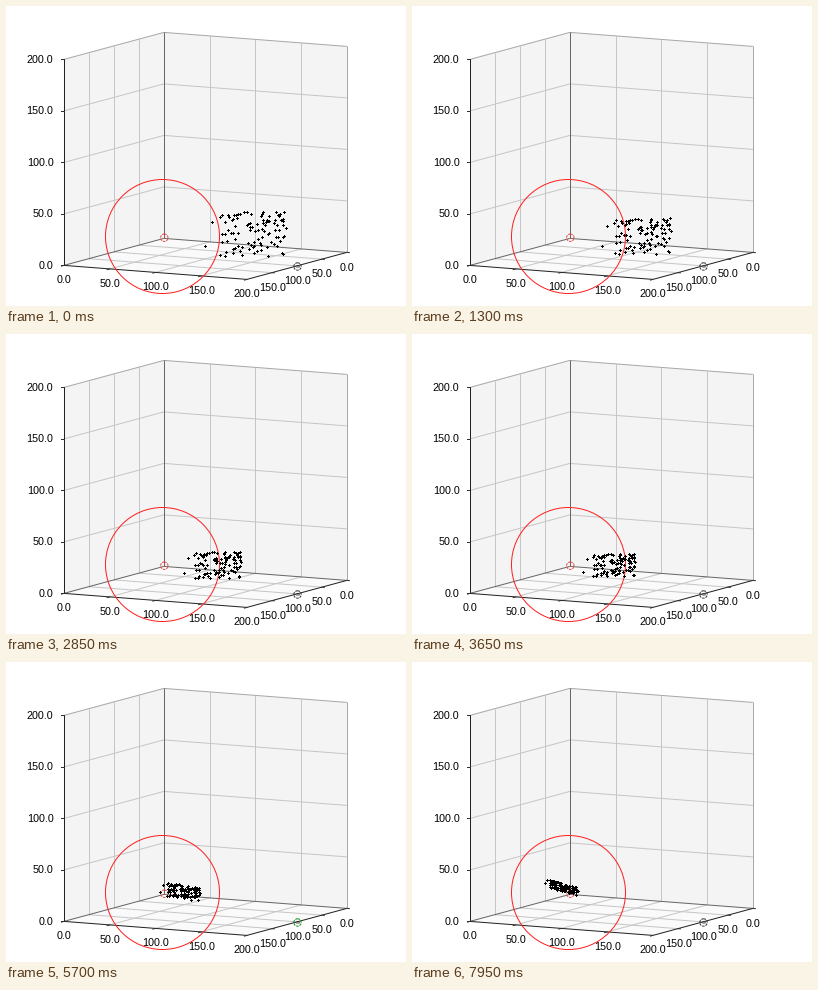
These frames come from a looping animation (400x300 px, 8 s). A matplotlib script:

```python
import numpy as np
import matplotlib.pyplot as plt
from matplotlib.animation import FuncAnimation
from matplotlib.collections import PolyCollection
from matplotlib.patches import Circle, Polygon

PX = 0.72  # points per pixel at 100 dpi
FRAMES, STEP = 160, 50
COUNT = 102

plt.rcParams["font.family"] = "Liberation Sans"
fig = plt.figure(figsize=(4, 3), dpi=100, facecolor="white")
ax = fig.add_axes([0, 0, 1, 1])
ax.set_xlim(0, 400)
ax.set_ylim(300, 0)
ax.axis("off")

# Orthographic box: screen position of the left floor corner and unit axes
ORIGIN = np.array([57.9, 259.4])
AXES = np.array([[183, 14], [100, -27], [0, -206]])


def project(x, y, z):
    return ORIGIN + np.dot([x, y, z], AXES)


def line(a, b, color, z=2):
    p, q = project(*a), project(*b)
    ax.plot([p[0], q[0]], [p[1], q[1]], color=color, lw=PX,
            solid_capstyle="butt", zorder=z)


def face(color, *corners):
    ax.add_patch(Polygon([project(*c) for c in corners], fc=color, ec="none",
                         zorder=0))


def label(value, x, y, ha="center"):
    ax.text(x, y, f"{value:.1f}", fontsize=10.8 * PX, ha=ha,
            va="center_baseline", color="black", zorder=6)


def tick(p, dx, dy):
    ax.plot([p[0], p[0] + dx], [p[1], p[1] + dy], color="#303030",
            lw=PX, zorder=3)


def draw_box():
    left, back, right, front = (0, 0, 0), (0, 1, 0), (1, 1, 0), (1, 0, 0)
    left_top, back_top, right_top = (0, 0, 1), (0, 1, 1), (1, 1, 1)
    face("#f4f4f4", left, back, back_top, left_top)
    face("#f4f4f4", back, right, right_top, back_top)
    face("#fafafa", left, front, right, back)

    grid = "#c6c6c6"
    for s in (0.25, 0.5, 0.75):
        line((0, s, 0), (0, s, 1), grid)
        line((s, 1, 0), (s, 1, 1), grid)
        line((0, 0, s), (0, 1, s), grid)
        line((0, 1, s), (1, 1, s), grid)
        line((s, 0, 0), (s, 1, 0), grid)
        line((0, s, 0), (1, s, 0), grid)

    for a, b in ((left_top, back_top), (back_top, right_top),
                 (right, right_top)):
        line(a, b, "#a8a8a8")
    for end in (left, right, back_top):
        line(back, end, "#666666")
    for a, b in ((left, left_top), (left, front), (front, right)):
        line(a, b, "#222222", z=3)


def draw_labels():
    for s in np.linspace(0, 1, 5):
        p = project(0, 0, s)
        tick(p, -3, 0)
        label(200 * s, 47.5, p[1] - 0.5, "right")
        p = project(s, 0, 0)
        tick(p, -2.5, 0.7)
        label(200 * s, p[0], p[1] + 14)
        if s > 0:
            p = project(1, s, 0)
            tick(p, 2.5, 0.2)
            label(200 * (1 - s), p[0] + 0.5, p[1] + 14.2)


def draw_target(x, y, color):
    ring = Circle((x, y), 3.7, fc="none", ec=color, lw=PX, zorder=4,
                  ls=(0, (2.5, 1)))
    ax.add_patch(ring)
    ax.plot([x - 1.5, x + 1.5], [y, y], color=color, lw=0.7 * PX, alpha=0.6,
            zorder=4)
    return ring


# Each particle keeps its place in the swarm: u across, v down, both -1..1
rng = np.random.default_rng(12)
u = rng.triangular(-1, 0.1, 1, COUNT)
v = rng.uniform(-1, 1, COUNT)

# A particle is a three pixel wide plus
arm = np.array([(1, 0), (2, 0), (2, 1)])
PLUS = np.vstack([arm, 3 - arm[::-1, ::-1] * [0, 1], 3 - arm, arm[::-1, ::-1]])
PLUS = np.array([(1, 0), (2, 0), (2, 1), (3, 1), (3, 2), (2, 2),
                 (2, 3), (1, 3), (1, 2), (0, 2), (0, 1), (1, 1)]) - 1


def smooth(x):
    x = np.clip(x, 0, 1)
    return x * x * (3 - 2 * x)


def swarm(sec):
    """Drifts left at a steady pace, shrinks, then tilts past the target."""
    part = sec / 8
    shrink = (1 - part) ** 1.5
    cx = 244 - 12 * sec
    cy = 228 + 2 * sec - 0.3 * sec ** 2
    x = cx + (20 + 28.5 * shrink) * u + 4 * part ** 5 * u ** 2
    y = cy + (4 + 18 * shrink) * v + 6.5 * smooth((sec - 4) / 3) * u
    return np.round(np.column_stack([x, y]))


draw_box()
draw_labels()
ax.add_patch(Circle((156.5, 230.5), 57, fc="none", ec="#ff2020", lw=PX,
                    zorder=4))
draw_target(158.3, 231.7, "#e04848")
goal = draw_target(291.5, 260.5, "#333333")
dots = PolyCollection([], fc="black", ec="none", lw=0, antialiased=False,
                      zorder=5)
ax.add_collection(dots, autolim=False)


def update(frame):
    sec = frame * STEP / 1000
    dots.set_verts(swarm(sec)[:, None] + PLUS)
    goal.set_edgecolor("#109010" if 5.4 <= sec < 6 else "#333333")
    return dots, goal


anim = FuncAnimation(fig, update, frames=FRAMES, interval=STEP, repeat=True,
                     repeat_delay=0, blit=False)
plt.show()
```
